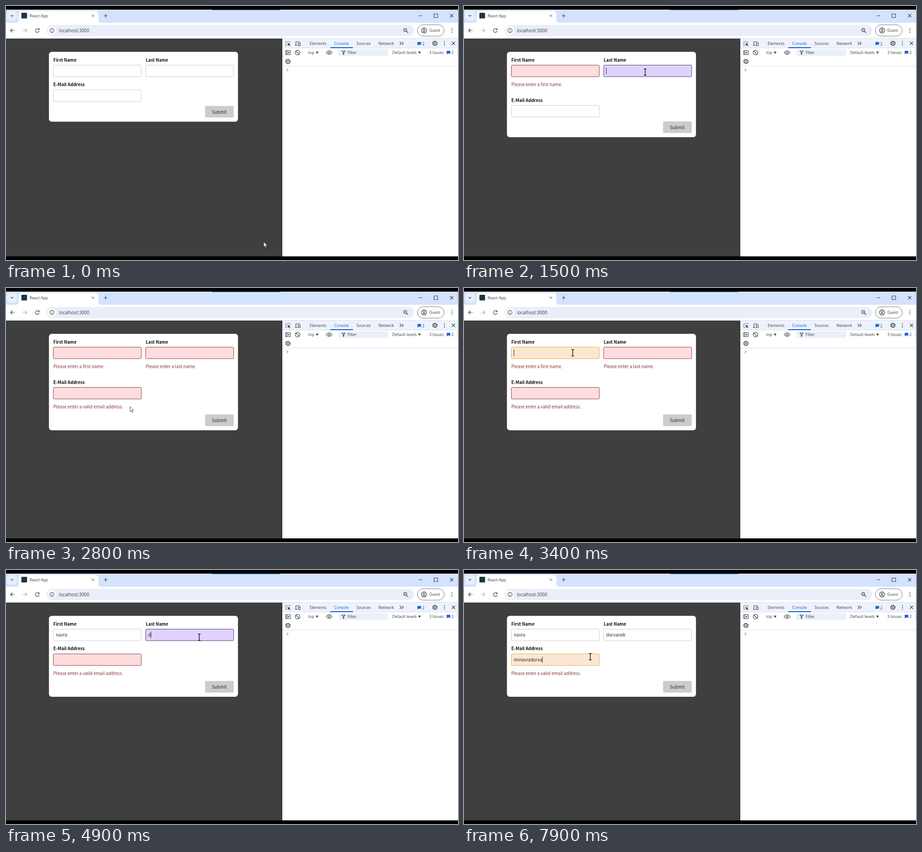
Write an HTML page that moves like this. It is 998 px wide and 561 px high and loops after 8000 ms.

```html
<!DOCTYPE html>
<html lang="en">
<head>
<meta charset="utf-8">
<title>Form validation</title>
<style>
  html, body { margin: 0; width: 100%; height: 100%; overflow: hidden; background: #000; }
  svg { display: block; width: 100vw; height: 100vh; }
  text { font: 8.65px "Open Sans", "Noto Sans", sans-serif; fill: #3a3d42; white-space: pre; }
  .form text { font: 9.63px "Noto Sans CJK JP", "Noto Sans CJK SC", "Noto Sans CJK", sans-serif; fill: #2a2a2a; }
  .form .label { font-weight: 700; fill: #111; }
  .form .error { fill: #8b3030; }
  .icon { fill: none; stroke: #3c4043; stroke-width: 1.2; }
  .solid { fill: #3c4043; }
  .blue { fill: #1a66d6; }
</style>
</head>
<body>
<svg viewBox="0 0 998 561">
  <defs>
    <g id="gear" class="icon">
      <circle r="3.9" stroke-width="1.3"/>
      <circle r="5.1" stroke-width="1.5" stroke-dasharray="2 2"/>
      <circle r="1.4" class="solid" stroke="none"/>
    </g>
    <g id="dots" class="solid"><circle cy="-4" r="1.1"/><circle r="1.1"/><circle cy="4" r="1.1"/></g>
    <path id="cross" class="icon" d="M-3.5-3.5 3.5 3.5M3.5-3.5-3.5 3.5"/>
    <path id="bubble" class="blue" d="M-4-3.5H4V2.5H-2L-4 4.5Z"/>
    <path id="drop" class="solid" d="M-3-2.3H3L0 2.7Z"/>
  </defs>

  <!-- Browser window -->
  <path fill="#d3e3fd" d="M0 8H998V37H0Z"/>
  <path fill="#27466b" d="M455 7.5H606V9H455Z"/>
  <path fill="#fff" d="M0 37H998V72H0Z"/>
  <rect x="2" y="11" width="22" height="21" rx="6" fill="#e6effd"/>
  <path class="icon" d="M10.2 20 13 22.8 15.8 20"/>
  <path fill="#fff" d="M22 37Q28 37 28 31V18Q28 11 35 11H197Q204 11 204 18V31Q204 37 210 37Z"/>
  <rect x="34" y="15" width="12.5" height="12.5" rx="1" fill="#1f3540"/>
  <text x="52" y="24.8" style="font-size:8.75px">React App</text>
  <use href="#cross" transform="translate(192 21.5) scale(.75)"/>
  <path class="icon" d="M216 21.5H224M220 17.5V25.5"/>
  <path class="icon" d="M911 21.5H919M945 17.5H953V25.5H945Z" stroke-width="1"/>
  <use href="#cross" x="984" y="21.5"/>

  <path class="icon" d="M19 54H10.5M14 50 10 54 14 58"/>
  <path class="icon" d="M37 54H45.5M42 50 46 54 42 58" style="stroke:#a9adb3"/>
  <path class="icon" d="M72.2 51.4A4.2 4.2 0 1 0 73.2 54.8M73.3 49.2V52.2H70.3"/>
  <rect x="89.5" y="41.8" width="811.5" height="24.6" rx="12.3" fill="#e9eef8"/>
  <circle cx="101.5" cy="54" r="9.3" fill="#fff"/>
  <circle class="icon" cx="101.5" cy="54" r="4.6"/>
  <path class="icon" d="M101.5 53.5V56.6M101.5 51.3V52.4"/>
  <text x="117" y="57.8" style="font-size:9.93px">localhost:3000</text>
  <circle class="icon" cx="881.5" cy="53" r="3.3"/>
  <path class="icon" d="M884 55.5 888 59.5M880 53H883"/>
  <rect x="908.5" y="41.5" width="59" height="25" rx="12.5" fill="#fff" stroke="#777a7e"/>
  <circle class="icon" cx="923" cy="54" r="5.8"/>
  <circle class="icon" cx="923" cy="52.5" r="2"/>
  <path class="icon" d="M919 58Q923 54.6 927 58"/>
  <text x="934.8" y="57.1">Guest</text>
  <use href="#dots" x="984.5" y="54"/>

  <!-- Developer tools -->
  <path fill="#fff" d="M610 72H998V553H610Z"/>
  <path fill="#eef3fb" d="M610 72H998V93H610Z"/>
  <path fill="none" stroke="#d3e0f3" d="M610 92.8H998M610 132.5H998M996.5 96V110M0 71.5H998"/>
  <path class="icon" d="M621 87H618V78.5H627V81" stroke-dasharray="1.6 1"/>
  <path class="solid" d="M621.5 81.5 628 84 625.5 85.2 628 87.7 627 88.7 624.5 86.2 623.4 88.5Z"/>
  <path class="icon" d="M648.5 79H640V86.5M638 87H644M645.5 81.5H649.5V87.5H645.5Z"/>
  <text x="670.5" y="86">Elements</text>
  <text x="724.5" y="86" class="blue" style="fill:#0b57d0">Console</text>
  <text x="773.7" y="86">Sources</text>
  <text x="822.5" y="86">Network</text>
  <path fill="#0b57d0" d="M716 91H766V93H716Z"/>
  <path class="icon" d="M869.5 79.2 872.8 82.5 869.5 85.8M874 79.2 877.3 82.5 874 85.8"/>
  <use href="#bubble" x="912.5" y="83"/>
  <text x="919" y="86.8">2</text>
  <use href="#gear" x="947" y="82.5"/>
  <use href="#dots" x="968" y="82.5"/>
  <use href="#cross" x="988" y="82.5"/>

  <path class="icon" d="M617.5 98.5H627.5V107.5H617.5ZM620.2 98.5V107.5"/>
  <path class="solid" d="M622.5 100.6 625.8 103 622.5 105.4Z"/>
  <path class="icon" d="M639.9 99.2 647.6 106.8"/>
  <circle class="icon" cx="643.7" cy="103" r="5.2"/>
  <text x="667" y="106.2">top</text>
  <use href="#drop" x="687" y="103"/>
  <path class="icon" d="M707 103Q713.5 94.5 720 103Q713.5 111.5 707 103Z"/>
  <circle class="icon" cx="713.5" cy="103" r="2"/>
  <rect x="734" y="95.5" width="110" height="15" rx="4" fill="#ebf0fa"/>
  <path class="icon" d="M741.8 99.5H748.8L746 103V107H744.6V103Z"/>
  <text x="754" y="106.2">Filter</text>
  <text x="852.7" y="106.2">Default levels</text>
  <use href="#drop" x="913" y="103"/>
  <text x="934.7" y="106.2" style="font-size:8.3px">3 Issues:</text>
  <use href="#bubble" x="977" y="102.5"/>
  <text x="983.5" y="106.2">2</text>
  <use href="#gear" x="622.5" y="122.5"/>
  <path fill="none" stroke="#5b8def" stroke-width="1.2" d="M620 138.2 622.8 141 620 143.8"/>

  <!-- Page -->
  <path fill="#3f3f3f" d="M0 72H609.5V553H0Z"/>
  <g class="form">
    <rect id="card" x="94.8" y="101.3" width="417.4" rx="6.2" fill="#fff"/>
    <g id="fields"></g>
    <g id="submit">
      <rect x="439.5" y="220.7" width="63.3" height="25.6" rx="2" fill="#ccc"/>
      <text x="454.5" y="237.6" fill="#333">Submit</text>
    </g>
  </g>
  <path id="arrow" fill="#fff" stroke="#222" stroke-width=".8" d="M0 0V11.3L2.6 8.9 4.4 12.9 6.1 12.2 4.4 8.2H8Z"/>
  <path id="beam" fill="none" stroke="#111" stroke-width="1.4" d="M-2.8-7H-.8L0-6.4.8-7H2.8M0-6.4V6.4M-2.8 7H-.8L0 6.4.8 7H2.8"/>
</svg>

<script>
const LOOP = 8000, STEP = 100, BLINK = 500;
const INPUT_W = 194.2, INPUT_H = 25.5;
const ROW1_Y = 130.6, ROW2_Y = 185.4, ROW1_ERROR = 34.2, ROW2_ERROR = 24.4;

const STYLES = {
  idle:     { fill: '#fff',    stroke: '#ccc' },
  focus:    { fill: '#e0d2fd', stroke: '#49396f' },
  bad:      { fill: '#fddddd', stroke: '#8b3b3b', error: true },
  badFocus: { fill: '#fbe8d2', stroke: '#eda544', error: true },
};

// states: [time, style]; keys: the time of each typed letter
const fields = [
  { label: 'First Name', error: 'Please enter a first name.', x: 104.5, row: 1,
    states: [[0, 'idle'], [500, 'focus'], [1200, 'bad'], [3300, 'badFocus'], [3700, 'focus'], [4600, 'idle']],
    value: 'navra', keys: [3700, 3800, 4000, 4100, 4300] },
  { label: 'Last Name', error: 'Please enter a last name.', x: 308.4, row: 1,
    states: [[0, 'idle'], [1500, 'focus'], [2000, 'bad'], [4600, 'badFocus'], [4800, 'focus'], [6000, 'idle']],
    value: 'dorvanek', keys: [4800, 5000, 5100, 5200, 5300, 5400, 5500, 5500] },
  { label: 'E-Mail Address', error: 'Please enter a valid email address.', x: 104.5, row: 2,
    states: [[0, 'idle'], [2400, 'focus'], [2800, 'bad'], [6000, 'badFocus']],
    value: 'imnavradorva', keys: [6400, 6500, 6800, 6900, 7000, 7100, 7200, 7500, 7600, 7700, 7800, 7900] },
];

// Pointer path: [time, x, y]
const path = [
  [0, 569, 521], [500, 240, 143], [700, 245, 147], [800, 245, 147], [1000, 261, 168.5], [1200, 261, 168.5],
  [1500, 400, 146], [1600, 400, 146], [1900, 338, 181], [2000, 338, 181], [2300, 277.5, 224.5],
  [2400, 277.5, 224.5], [2600, 274, 262], [2900, 274, 262], [3300, 240, 143], [4200, 240, 143],
  [4400, 426.7, 148.5], [5700, 426.7, 148.5], [6000, 278.8, 191.5], [LOOP, 278.8, 191.5],
];

const byId = id => document.getElementById(id);
const set = (el, attrs) => { for (const k in attrs) el.setAttribute(k, attrs[k]); };
const show = (el, on) => { el.style.display = on ? '' : 'none'; };
const move = (el, x, y) => el.setAttribute('transform', `translate(${x} ${y})`);

function add(parent, tag, attrs, content = '') {
  const el = document.createElementNS('http://www.w3.org/2000/svg', tag);
  set(el, attrs);
  el.textContent = content;
  return parent.appendChild(el);
}

for (const f of fields) {
  f.group = add(byId('fields'), 'g', {});
  add(f.group, 'text', { class: 'label', y: -8 }, f.label);
  f.box = add(f.group, 'rect', { width: INPUT_W, height: INPUT_H, rx: 2 });
  f.text = add(f.group, 'text', { x: 5.4, y: 16.8 });
  f.caret = add(f.group, 'path', { stroke: '#222' });
  f.message = add(f.group, 'text', { class: 'error', y: 46.7 }, f.error);
}

function pointerAt(t) {
  const i = Math.max(1, path.findIndex(p => p[0] >= t));
  const [t0, x0, y0] = path[i - 1], [t1, x1, y1] = path[i];
  const u = (t - t0) / (t1 - t0), e = u * u * (3 - 2 * u);
  return [x0 + (x1 - x0) * e, y0 + (y1 - y0) * e];
}

function drawField(f, t) {
  const { fill, stroke } = f.style;
  const typed = f.keys.filter(k => k <= t);
  const lastInput = Math.max(f.since, ...typed);
  const focused = f.styleName.toLowerCase().endsWith('focus');
  move(f.group, f.x, f.y);
  set(f.box, { fill, stroke });
  f.text.textContent = f.value.slice(0, typed.length);
  show(f.message, f.style.error);
  show(f.caret, focused && (t - lastInput) % (2 * BLINK) < BLINK);
  const caretX = 5.8 + (typed.length ? f.text.getComputedTextLength() : 0);
  set(f.caret, { d: `M${caretX} 5.6V20` });
}

function draw(t) {
  for (const f of fields) {
    [f.since, f.styleName] = f.states.filter(s => s[0] <= t).pop();
    f.style = STYLES[f.styleName];
  }
  const hasError = row => fields.some(f => f.row === row && f.style.error);
  const shift1 = hasError(1) ? ROW1_ERROR : 0;
  const shift2 = shift1 + (hasError(2) ? ROW2_ERROR : 0);
  for (const f of fields) {
    f.y = f.row === 1 ? ROW1_Y : ROW2_Y + shift1;
    drawField(f, t);
  }
  set(byId('card'), { height: 154.3 + shift2 });
  move(byId('submit'), 0, shift2);

  const [x, y] = pointerAt(t);
  const overInput = fields.some(f => x > f.x && x < f.x + INPUT_W && y > f.y && y < f.y + INPUT_H);
  for (const id of ['arrow', 'beam']) {
    move(byId(id), x, y);
    show(byId(id), overInput === (id === 'beam'));
  }
}

const start = performance.now();
function tick() {
  const t = (performance.now() - start) % LOOP;
  draw(Math.floor(t / STEP) * STEP);
  requestAnimationFrame(tick);
}
tick();
</script>
</body>
</html>
```
